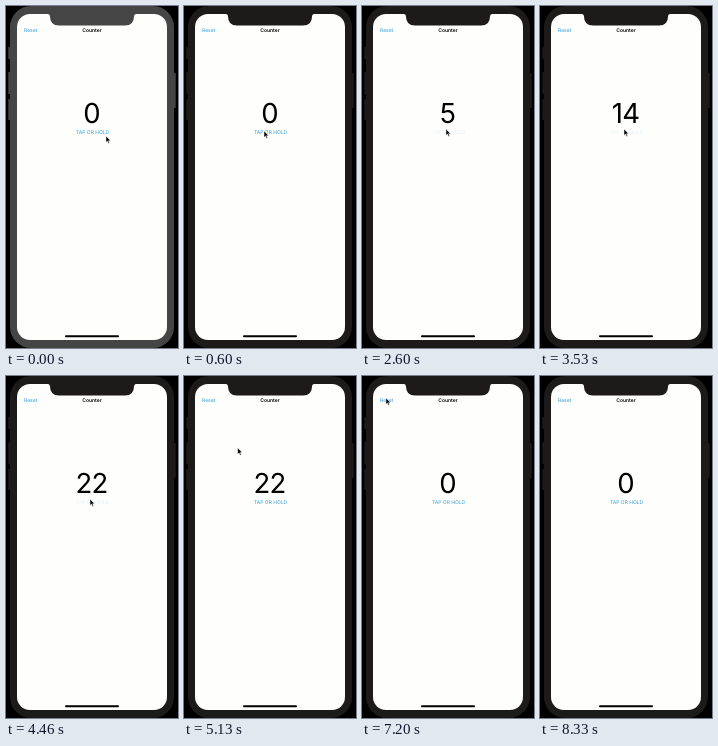
Write an HTML page that moves like this. It is 172 by 342 pixels and loops after 8860 ms.

```html
<!DOCTYPE html>
<html lang="en">
<head>
<meta charset="utf-8">
<title>Counter</title>
<style>
  html, body { margin: 0; height: 100%; overflow: hidden; background: #000; }
  svg { display: block; width: 100vw; height: 100vh; }
  text { font: 5px Inter, Roboto, sans-serif; text-rendering: geometricPrecision; }
  .link { fill: #2d9cdb; }
  .mid { text-anchor: middle; }
  #title { font-weight: 600; }
  #count { font-size: 27.5px; letter-spacing: -.8px; }
</style>
</head>
<body>
<svg viewBox="0 0 172 342">
  <g id="body" fill="#1c1b19">
    <rect x="4" y="0" width="164" height="342" rx="21"/>
    <rect x="2.3" y="41" width="2" height="12" rx=".6"/>
    <rect x="2.3" y="66" width="2" height="22" rx=".6"/>
    <rect x="2.3" y="93" width="2" height="21" rx=".6"/>
    <rect x="167.7" y="67" width="2" height="35" rx=".6"/>
  </g>
  <rect x="11" y="8" width="150" height="326" rx="13" fill="#fefefc"/>
  <path id="notch" fill="#1c1b19" d="M42 7.5V8Q44 8 44 10.5Q44 19.5 53 19.5H119Q128 19.5 128 10.5Q128 8 130 8V7.5Z"/>
  <rect x="59" y="329.2" width="54" height="2" rx="1"/>
  <text id="reset" class="link" x="18" y="26">Reset</text>
  <text id="title" class="mid" x="86" y="26">Counter</text>
  <text id="count" class="mid" x="85.5" y="117">0</text>
  <text id="tap" class="link mid" x="86.6" y="127.8">TAP OR HOLD</text>
  <path id="cursor" stroke="#fff" stroke-width=".5" d="M0 0V6.4L1.5 5.1 2.5 7.4 3.6 6.9 2.6 4.7H4.6Z"/>
</svg>
<script>
const LOOP = 8860, FRAME = 200 / 3;
const $ = id => document.getElementById(id);
const clamp = v => Math.min(1, Math.max(0, v));

// time, x, y of the pointer tip
const path = [
  [0, 100, 130], [600, 80, 125], [930, 84, 123], [4730, 84, 123],
  [5530, 24, 22], [7700, 24, 22], [8270, 55, 196], [LOOP, 55, 196]
];
const taps = [[990, 1130], [1340, 1480], [1990, 4510]];
const resets = [[6650, 6940]];
const firstCounts = [1130, 1480, 2320, 2455, 2595];

function pointer(t) {
  const i = path.findIndex(p => p[0] > t);
  const [t0, x0, y0] = path[i - 1], [t1, x1, y1] = path[i];
  const u = (t - t0) / (t1 - t0), e = u * u * (3 - 2 * u);
  return [x0 + (x1 - x0) * e, y0 + (y1 - y0) * e];
}

// Touch feedback: fades down on press, back up on release
function opacity(t, presses) {
  return Math.min(...presses.map(([down, up]) =>
    1 - .87 * clamp((t - down) / 130) * (1 - clamp((t - up) / 250))));
}

function count(t) {
  if (t >= 6940) return 0;
  if (t >= 2655) return Math.min(22, 6 + Math.floor((t - 2655) / 109));
  return firstCounts.filter(s => s <= t).length;
}

function draw(now) {
  const t = Math.floor((now % LOOP + 7) / FRAME) * FRAME % LOOP;
  const shade = t < 60 ? '#464545' : '#1c1b19';
  $('body').setAttribute('fill', shade);
  $('notch').setAttribute('fill', shade);
  $('count').textContent = count(t);
  $('tap').style.opacity = opacity(t, taps);
  $('reset').style.opacity = opacity(t, resets);
  $('cursor').setAttribute('transform', `translate(${pointer(t)})`);
  $('cursor').style.display = t < 8320 ? '' : 'none';
}

const start = performance.now();
function tick() {
  draw(performance.now() - start);
  requestAnimationFrame(tick);
}
tick();
</script>
</body>
</html>
```
